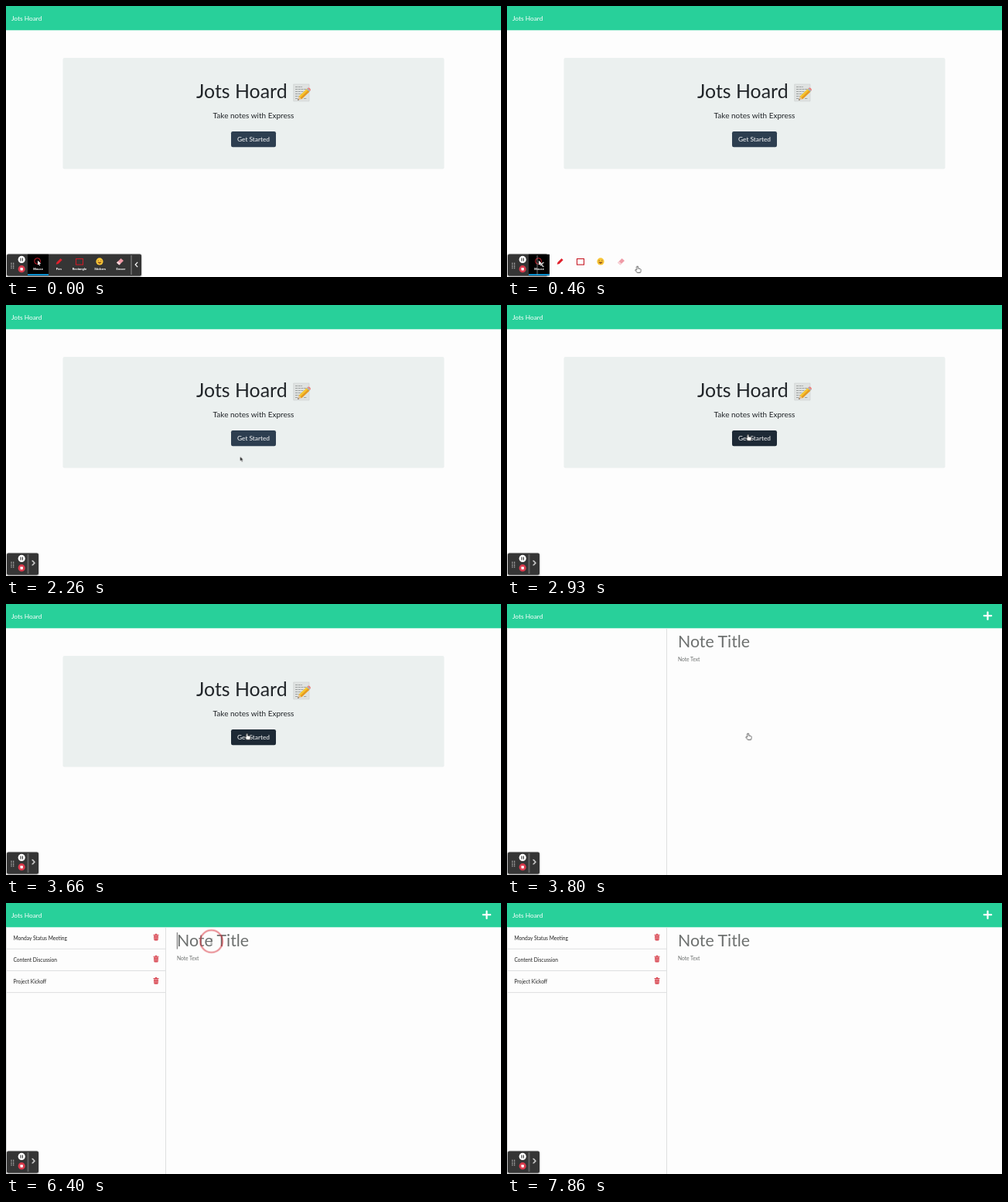
An HTML page that plays this animation: 640 by 350 pixels, repeating every 8 s.

```html
<!DOCTYPE html>
<html lang="en">
<head>
<meta charset="utf-8">
<title>Jots Hoard</title>
<style>
  html, body { margin: 0; width: 100%; height: 100%; overflow: hidden; background: #fdfdfd; }
  #stage { display: block; width: 100vw; height: 100vh; }
  text { font-family: Lato, sans-serif; }
  .mid { text-anchor: middle; }
  .label { font: 700 4.1px Roboto, sans-serif; fill: #fff; text-anchor: middle; }
  .line { fill: none; stroke: #dedfe0; stroke-width: 1; }
  .pointer { fill: #fff; stroke: #222; stroke-width: .7; stroke-linejoin: round; }
</style>
</head>
<body>
<svg id="stage" viewBox="0 0 640 350">
  <defs>
    <filter id="soft" x="-20%" y="-40%" width="140%" height="180%"><feGaussianBlur stdDeviation="1.3"/></filter>
    <g id="trash" fill="#d8434e">
      <path d="M-3.5-3.5h2l.6-1h1.8l.6 1h2v1h-7zM-3-2h6l-.4 5.4q-.1.8-.9.8h-3.4q-.8 0-.9-.8z"/>
      <path d="M-1.4-1v4M0-1v4M1.4-1v4" stroke="#f3c3c7" stroke-width=".5"/>
    </g>
  </defs>

  <rect width="640" height="350" fill="#fdfdfd"/>
  <rect width="640" height="31.3" fill="#28d09a"/>
  <text x="7" y="18.6" font-size="8.33" fill="#fff">Jots Hoard</text>

  <g id="home">
    <rect x="73.5" y="67" width="493" height="143.5" rx="2" fill="#ebf0ef"/>
    <text x="246" y="119.4" font-size="24.89" fill="#212529">Jots Hoard</text>
    <g id="memo">
      <path d="M371.7 101h20.3v22h-20.3z" fill="#dfe2e1" stroke="#c6cac9" stroke-width=".5"/>
      <path d="M374 104.5h9M374 107.5h15M374 110.5h13M374 113.5h10M374 116.5h6M374 119.5h4M385 119.5h4"
            stroke="#8d9291" stroke-width=".8" stroke-dasharray="3 .7"/>
      <path d="M377.2 121.8l1.4-5 3.6 3.5z" fill="#e9c08e"/>
      <path d="M377.2 121.8l.5-1.7 1.2 1.2z" fill="#333"/>
      <path d="M378.6 116.8l10-9.6 3.7 3.6-10.1 9.5z" fill="#f7c52d"/>
      <path d="M380.5 118.6l10-9.6 1.8 1.8-10.1 9.5z" fill="#e59a24"/>
      <path d="M388.6 107.2l1.2-1.1 3.7 3.5-1.2 1.2z" fill="#aab0b2"/>
      <path d="M389.8 106.1q1.6-1.3 3.2.3t.5 3.2z" fill="#ec7a78"/>
    </g>
    <text class="mid" x="320" y="145.2" font-size="10" fill="#212529">Take notes with Express</text>
    <rect id="button" x="291" y="162" width="58" height="20.3" rx="2.2" fill="#2d3e50"/>
    <text class="mid" x="320" y="175.2" font-size="8.33" fill="#fff">Get Started</text>
  </g>

  <g id="notes">
    <path class="line" d="M.5 31.3V350M206.5 31.3V350"/>
    <path d="M621.5 10.5v9.4M616.8 15.2h9.4" stroke="#fff" stroke-width="2.2" stroke-linecap="round"/>
    <text x="221" y="56" font-size="21.33" fill="#6d706f">Note Title</text>
    <text x="221" y="73.6" font-size="6.67" fill="#6d706f">Note Text</text>
    <g id="list"></g>
    <path id="caret" d="M221.3 38v21.5" stroke="#555" stroke-width=".9"/>
  </g>

  <g id="toolbar">
    <rect class="panel" x="1" y="321" width="174" height="28.5" rx="2" fill="#000" opacity=".5" filter="url(#soft)"/>
    <rect class="panel" x="1" y="320.5" width="174" height="28" rx="2" fill="#353535"/>
    <path d="M7 331.8v7.5M9.7 331.8v7.5" stroke="#ddd" stroke-width="1.1" stroke-dasharray="1.1 1.03"/>
    <circle cx="20.2" cy="327.4" r="4.6" fill="#fff"/>
    <path d="M19 325.4v4M21.4 325.4v4" stroke="#333" stroke-width="1.1"/>
    <circle cx="20.2" cy="339.7" r="4.6" fill="#d93a4c"/>
    <rect x="18.5" y="338" width="3.4" height="3.4" rx=".4" fill="#fff"/>
    <svg id="tools" x="28" y="320.5" width="134" height="28">
      <rect width="27" height="28" fill="#000"/>
      <rect y="25.7" width="27" height="1.8" fill="#0a9fe6"/>
      <circle cx="12.6" cy="9" r="3.9" fill="none" stroke="#d8222f" stroke-width="1"/>
      <path d="M13 8.2l4.2 4-2 .2 1 2.1-.9.4-1-2-1.3 1.2z" fill="#fff"/>
      <path d="M36.7 13.2l.8-2.8 5-5 2.2 2.2-5 5z" fill="#e0202c"/>
      <rect x="62.5" y="6" width="9" height="7.6" fill="none" stroke="#c81c27" stroke-width="1.1"/>
      <circle cx="93" cy="9.4" r="4.6" fill="#f8c536"/>
      <path d="M90.5 8.3h1.5M94 8.3h1.5M90.8 10.6q2.2 2.6 4.4 0z" fill="#8a4b1c" stroke="#8a4b1c" stroke-width=".7"/>
      <path d="M115 11l5.6-5.6 3.4 3-5.6 5.6z" fill="#ef9aa6"/>
      <path d="M115 11l1.8-1.8 3.4 3-1.8 1.8z" fill="#f7d5da"/>
      <g id="labels"></g>
    </svg>
    <g id="cap">
      <path d="M162 322v25" stroke="#a5a5a5" stroke-width=".8"/>
      <path id="fold" d="M170.2 330.8l-3 3.2 3 3.2" fill="none" stroke="#fff" stroke-width="1.2"/>
      <path id="unfold" d="M167.4 330l3 3.2-3 3.2" fill="none" stroke="#fff" stroke-width="1.2"/>
    </g>
  </g>

  <g id="ring"><circle id="pulse" r="14.4" fill="none" stroke="#d93640" stroke-width="1.9"/></g>
  <g id="cursor">
    <path id="arrow" class="pointer" style="fill:#111;stroke:#fff;stroke-width:.5" d="M0 0v6l1.4-1.2 1 2.2 1.1-.5-1-2.1h1.8z"/>
    <path id="hand" class="pointer" d="M-1 .6Q0-.6 1 .6V3l2.7.6Q4.8 4 4.6 5.4L3.8 8.4H-.3L-2.8 5.2Q-2.8 4-1 5z"/>
    <path id="beam" d="M-1.4-3.4Q0-3.4 0-2.4Q0-3.4 1.4-3.4M0-2.4v5M-1.4 3.4Q0 3.4 0 2.4Q0 3.4 1.4 3.4"
          fill="none" stroke="#555" stroke-width=".6"/>
  </g>
</svg>

<script>
const LOOP = 8000;
const $ = selector => document.querySelector(selector);

$('#list').innerHTML = ['Monday Status Meeting', 'Content Discussion', 'Project Kickoff'].map((name, i) => {
  const y = 31 + i * 28.15;
  return `<text x="9.4" y="${y + 16.8}" font-size="6.67" fill="#222">${name}</text>
    <use href="#trash" x="194" y="${y + 13.2}"/>
    <path class="line" d="M1 ${y + 28.3}H206"/>`;
}).join('');

$('#labels').innerHTML = ['Mouse', 'Pen', 'Rectangle', 'Stickers', 'Eraser'].map((name, i) =>
  `<text class="label" x="${13.6 + i * 26.7}" y="20.9">${name}</text>`).join('');

// stops: [ms, value, easing to the next stop]
function track(selector, prop, stops, easing = 'linear') {
  const all = [...stops, [LOOP, stops.at(-1)[1]]];
  const keys = all.map(([ms, value, ease]) => ({ offset: ms / LOOP, [prop]: value, easing: ease || easing }));
  document.querySelectorAll(selector).forEach(el => el.animate(keys, { duration: LOOP, iterations: Infinity }));
}

// Visible only within the given [from, to] spans
function show(selector, ...spans) {
  const stops = spans.flatMap(([from, to]) => [[from, 1], [to, 0]]).filter(([ms]) => ms < LOOP);
  if (stops[0][0] > 0) stops.unshift([0, 0]);
  track(selector, 'opacity', stops, 'steps(1, end)');
}

const at = (x, y) => `translate(${x}px, ${y}px)`;

show('#home', [0, 3800]);
show('#notes', [3800, LOOP]);
show('#list', [3860, LOOP]);
show('#caret', [6400, 6860], [7400, 7860]);

const slide = 'ease-in-out';
track('.panel', 'width', [[0, '174px'], [60, '174px', slide], [560, '41px']]);
track('#tools', 'width', [[0, '134px'], [60, '134px', slide], [560, '0px']]);
track('#cap', 'transform', [[0, at(0, 0)], [60, at(0, 0), slide], [560, at(-133.5, 0)]]);
show('#tools', [0, 560]);
show('#fold', [0, 560]);
show('#unfold', [560, LOOP]);

track('#button', 'fill', [[0, '#2d3e50'], [2740, '#2d3e50'], [2930, '#1d2935']]);

track('#cursor', 'transform', [
  [0, at(168.6, 336)], [1200, at(168.6, 336), 'ease-in-out'],
  [1800, at(298, 207)], [2000, at(298, 207), 'ease-out'],
  [2260, at(302.6, 195.6)], [2330, at(302.6, 195.6), 'ease-in-out'],
  [2800, at(311.6, 167)], [4930, at(311.6, 167), 'ease-in-out'],
  [5330, at(265.6, 49.5)]
]);
show('#hand', [60, 1200], [2700, 3860]);
show('#arrow', [1200, 2700]);
show('#beam', [3860, 7400]);

track('#ring', 'transform', [[0, at(311.6, 168)], [4500, at(265.6, 49.5)]], 'steps(1, end)');
const hard = 'steps(1, end)';
track('#pulse', 'opacity', [
  [0, 0, hard], [3400, .65], [3470, .65], [3660, 0, hard],
  [6400, .65], [6530, .65], [6760, 0]
]);
</script>
</body>
</html>
```
